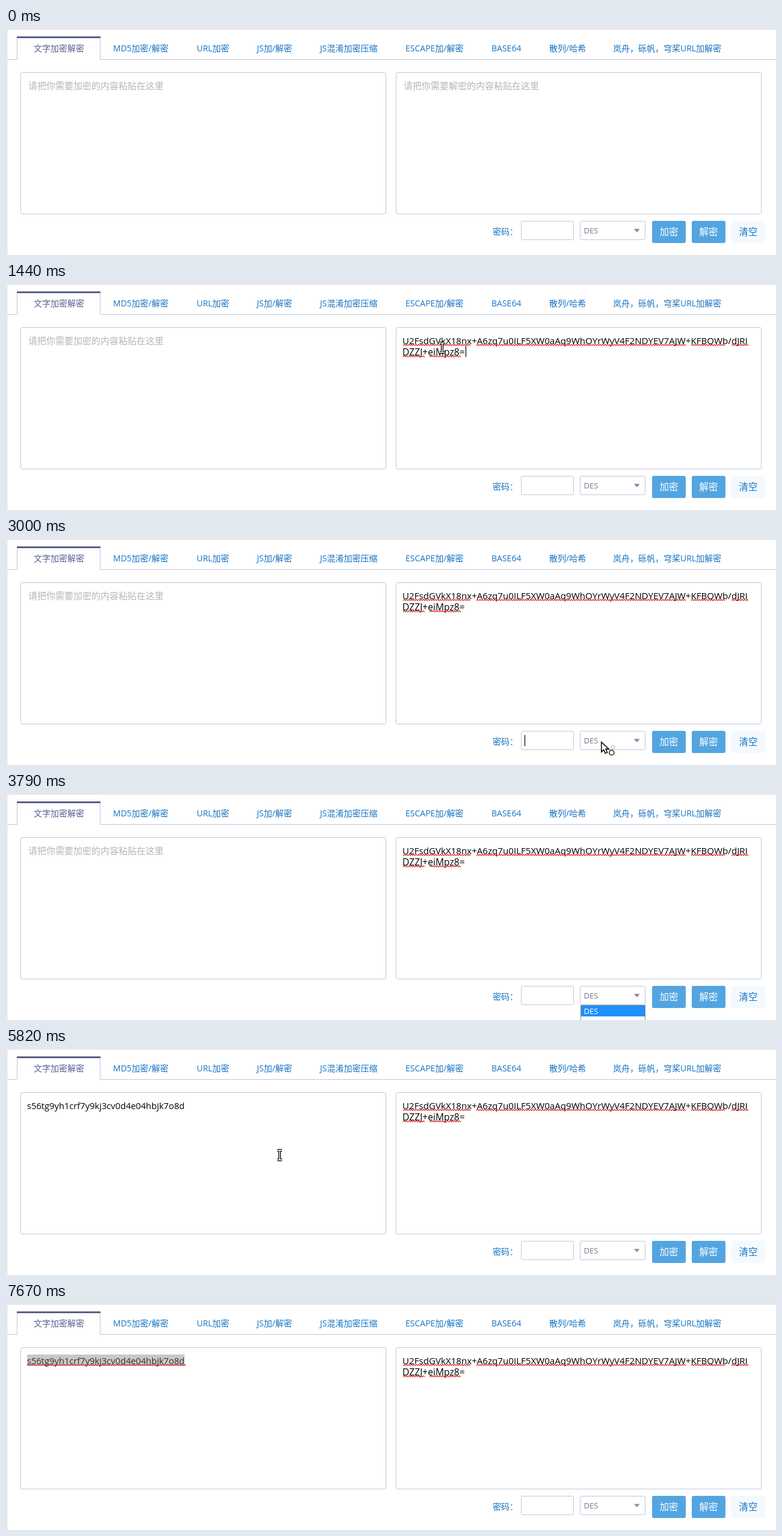
Animation, 1280 px wide and 379 px high, one loop 7.75 s. Source, as an HTML page:

```html
<!DOCTYPE html>
<html lang="zh-CN">
<head>
<meta charset="utf-8">
<style>
  html, body { margin: 0; width: 100%; height: 100%; overflow: hidden; background: #fff; }
  svg { display: block; width: 1280px; height: 379px; }
  text {
    font: 14px "Open Sans", "Noto Sans CJK SC", "Noto Sans CJK", sans-serif;
    font-kerning: none; white-space: pre;
  }
  .link text { fill: #1673c2; }
  .hint { font-size: 15px; fill: #b5b5b5; }
  .box { fill: #fff; stroke: #c0c8da; }
  .plain { font-size: 14.71px; }
  .select { font-size: 13px; fill: #77778c; }
  .button text { font-size: 15.5px; text-anchor: middle; fill: #fff; }
  .wave { fill: none; stroke: #e0282e; stroke-width: 1.1; }
</style>
</head>
<body>
<svg viewBox="0 0 1280 379">
  <defs><clipPath id="selectedArea"><rect id="clip" y="86" height="19"/></clipPath></defs>
  <path fill="#e7e7e7" d="M0 0H1280V3H2.5V379H0z"/>
  <path fill="none" stroke="#c0c8da" d="M2 52.5H18.5V16M156.5 16V52.5H1280"/>
  <path fill="#595f88" d="M18 14H157V17H18z"/>
  <text x="46" y="39" fill="#595f92">文字加密解密</text>
  <g class="link" id="tabs"></g>

  <rect class="box" x="24.5" y="74.5" width="607" height="236" rx="2"/>
  <rect class="box" x="648.5" y="74.5" width="607" height="236" rx="2"/>
  <text class="hint" id="leftHint" x="37" y="102">请把你需要加密的内容粘贴在这里</text>
  <text class="hint" id="rightHint" x="661" y="102">请把你需要解密的内容粘贴在这里</text>

  <g id="cipher">
    <text x="659" y="102" style="font-size:15.13px">U2FsdGVkX18nx+A6zq7u0ILF5XW0aAq9WhOYrWyV4F2NDYEV7AJW+KFBQWb/dJRI</text>
    <text x="659" y="121" style="font-size:15.6px">DZZJ+eiMpz8=</text>
    <path class="wave" id="cipherWave"/>
  </g>

  <g id="result">
    <text class="plain" id="plain" x="35" y="102">s56tg9yh1crf7y9kj3cv0d4e04hbjk7o8d</text>
    <g id="selection">
      <rect id="selectionBox" y="86" height="19"/>
      <text class="plain" id="selectedText" x="35" y="102" clip-path="url(#selectedArea)">s56tg9yh1crf7y9kj3cv0d4e04hbjk7o8d</text>
    </g>
    <path class="wave" id="plainWave"/>
  </g>

  <g class="link"><text x="809" y="345">密码：</text></g>
  <rect class="box" x="856.5" y="322.5" width="87" height="31" rx="2"/>
  <rect class="box" x="954.5" y="322.5" width="108" height="31" rx="2"/>
  <text class="select" x="960.5" y="342.5">DES</text>
  <path id="selectArrow" d="M1044 335.5h9.4l-4.7 5.5z"/>
  <g class="button">
    <rect x="1074" y="322" width="56" height="37" rx="3" fill="#53a5e2"/><text x="1102" y="346">加密</text>
    <rect id="decrypt" x="1140" y="322" width="56" height="37" rx="3"/><text x="1168" y="346">解密</text>
    <rect x="1206" y="322" width="56" height="37" rx="3" fill="#f4f9fe"/><text x="1234" y="346" style="fill:#1673c2">清空</text>
  </g>

  <g id="popup">
    <path fill="#fff" stroke="#8a8a8a" d="M955.5 354.5H1062.5V385H955.5z"/>
    <path fill="#1e90ff" d="M956 355H1062V373H956z"/>
    <text class="select" x="960.5" y="369" style="fill:#fff">DES</text>
  </g>

  <path id="caret" stroke="#000" stroke-width="1.2"/>
  <g id="cursor">
    <circle id="press" r="12.5" fill="#f7f046" opacity=".8"/>
    <g id="beam" fill="none">
      <path id="beamShape" stroke="#000" stroke-width="4.2" d="M-4-8h3l1 1 1-1h3M0-7v14M-4 8h3l1-1 1 1h3"/>
      <path stroke="#fff" stroke-width="1.6" d="M-4-8h3l1 1 1-1h3M0-7v14M-4 8h3l1-1 1 1h3"/>
    </g>
    <g id="arrow" fill="#fff">
      <path stroke="#111" stroke-width="1.6" d="M.6.8V17.2l3.9-3.6 2.7 6 3.2-1.4-2.6-5.8h5.3z"/>
      <circle cx="20" cy="9.3" r="3" stroke="#c4c4c4" stroke-width="1.3"/>
      <circle cx="17.6" cy="18.4" r="4" stroke="#4c4c4c" stroke-width="1.9"/>
    </g>
  </g>
</svg>
<script>
const LOOP = 7750;
const el = id => document.getElementById(id);
const show = (id, on) => el(id).setAttribute('visibility', on ? 'visible' : 'hidden');
const set = (id, attrs) => {
  for (const name in attrs) el(id).setAttribute(name, attrs[name]);
};
const between = (v, from, to) => v >= from && v < to;
const inside = (p, x0, y0, x1, y1) => between(p.x, x0, x1) && between(p.y, y0, y1);

const tabs = [
  [178, 'MD5加密/解密'], [317, 'URL加密'], [417, 'JS加/解密'], [522, 'JS混淆加密压缩'],
  [664, 'ESCAPE加/解密'], [807, 'BASE64'], [903, '散列/哈希'], [1009, '岚舟，砾帆，穹桨URL加解密']
];
el('tabs').innerHTML = tabs.map(([x, label]) => `<text x="${x}" y="39">${label}</text>`).join('');

const wave = (x0, x1, y) => `M${x0} ${y}` + 'l2-2 2 2'.repeat(Math.round((x1 - x0) / 4));
set('cipherWave', {
  d: wave(660, 772, 104.5) + wave(782, 1128, 104.5) + wave(1139, 1196, 104.5) +
     wave(1206, 1234, 104.5) + wave(660, 694, 123.5) + wave(704, 756, 123.5)
});
set('plainWave', { d: wave(35, 297, 104.5) });

// Pointer path: time, x, y
const path = [
  [530, 770, 310], [1000, 725, 108], [1590, 725, 108], [1600, 727, 109], [1750, 727, 110],
  [2200, 917, 318], [2450, 897, 341], [2860, 897, 341], [3000, 989, 340], [3080, 1001, 341],
  [3630, 1001, 341], [3790, 1003, 390], [4570, 1098, 358], [4810, 1178, 347], [4890, 1180, 344],
  [5420, 1180, 344], [5820, 456, 179], [6140, 94, 130], [6210, 61, 115], [6450, 12, 130],
  [6600, 12, 130], [6970, 481, 341]
];
const presses = [[920, 1070], [2540, 2690], [3230, 3400], [5040, 5190], [5980, 6600]];
// Text carets: from, to, x, top
const carets = [
  [1000, 1360, 660.5, 87], [1360, 2000, 764.5, 105], [2540, 2860, 764.5, 105], [2860, 3080, 862.5, 329]
];

function pointerAt(t) {
  const i = path.findIndex(key => key[0] > t);
  if (i < 1) return { x: path.at(-1)[1], y: path.at(-1)[2] };
  const [t0, x0, y0] = path[i - 1], [t1, x1, y1] = path[i];
  const k = (t - t0) / (t1 - t0);
  return { x: x0 + (x1 - x0) * k, y: y0 + (y1 - y0) * k };
}

function selectionStart(x) {
  const text = el('plain');
  const end = text.getEndPositionOfChar(text.getNumberOfChars() - 1).x;
  let best = end;
  for (let i = 0; i < text.getNumberOfChars(); i++) {
    const edge = text.getStartPositionOfChar(i).x;
    if (Math.abs(edge - x) < Math.abs(best - x)) best = edge;
  }
  return [best, end];
}

function draw(t) {
  const pointer = pointerAt(t);
  const visible = between(t, 530, 3790) || between(t, 4570, 6970);
  const dragging = between(t, 5980, 6600);
  const overText = dragging || inside(pointer, 24, 74, 632, 311) ||
    inside(pointer, 648, 74, 1256, 311) || inside(pointer, 856, 322, 944, 354);
  set('cursor', { transform: `translate(${pointer.x} ${pointer.y})` });
  show('beam', visible && overText);
  show('arrow', visible && !overText);
  show('press', presses.some(([from, to]) => between(t, from, to)));

  const caret = carets.find(([from, to]) => between(t, from, to));
  show('caret', caret);
  if (caret) set('caret', { d: `M${caret[2]} ${caret[3]}v18.5` });

  show('rightHint', t < 1000);
  show('cipher', t >= 1360);
  show('popup', between(t, 3230, 4340));
  set('selectArrow', { fill: t < 4340 ? '#a173a3' : '#8f8f96' });
  const hover = visible && inside(pointer, 1140, 322, 1196, 359);
  set('decrypt', { fill: hover ? '#76b8e9' : '#53a5e2' });

  const decrypted = t >= 5120, selected = t >= 5980;
  show('leftHint', !decrypted);
  show('result', decrypted);
  show('selection', selected);
  show('plainWave', selected);
  if (selected) {
    const [start, end] = selectionStart(dragging ? pointer.x : 0);
    const span = { x: start, width: end - start };
    const active = t < 7670;
    set('clip', span);
    set('selectionBox', { ...span, fill: active ? '#3390ff' : '#c8c8c8' });
    set('selectedText', { fill: active ? '#fff' : '#323232' });
  }
}

const origin = performance.now();
function frame() {
  draw((performance.now() - origin) % LOOP);
  requestAnimationFrame(frame);
}
frame();
</script>
</body>
</html>
```
